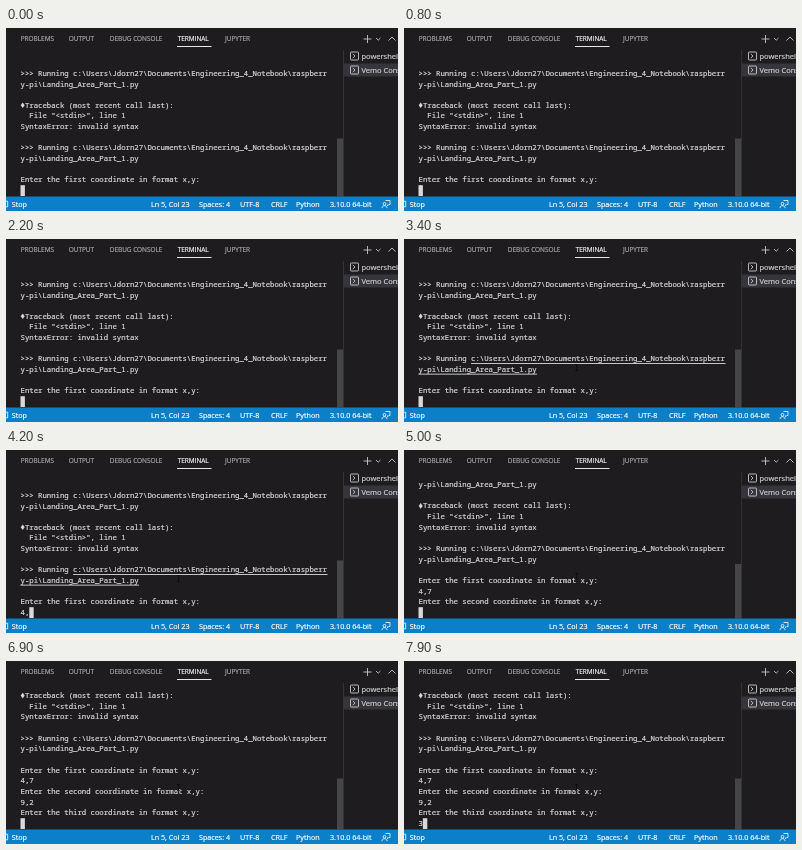
An HTML page for the animation above (8000 ms loop, 392 by 183 pixels).

```html
<!DOCTYPE html>
<html lang="en">
<head>
<meta charset="utf-8">
<title>Terminal session</title>
<style>
  html, body { margin: 0; width: 100%; height: 100%; overflow: hidden; background: #1e1c1f; }
  svg { display: block; width: 392px; height: 183px; }
  text { font-family: "Open Sans", "Noto Sans", sans-serif; white-space: pre; stroke-width: .2px; }
  .tabs { font-size: 6.45px; fill: #a4a4a4; stroke: #a4a4a4; }
  .tabs .on { fill: #f0f0f0; stroke: #f0f0f0; }
  .side { font-size: 7.5px; fill: #d0d0d0; stroke: #d0d0d0; }
  .status { font-size: 7.2px; fill: #fff; stroke: #fff; }
  .term text { font: 7.31px "Noto Sans Mono", "DejaVu Sans Mono", monospace; fill: #d8d8d8; stroke: #d8d8d8; }
  .line { fill: none; stroke: #c8c8c8; stroke-width: .9; }
</style>
</head>
<body>
<svg viewBox="0 0 392 183">
  <defs>
    <clipPath id="view"><rect y="29" width="331" height="140"/></clipPath>
    <g id="shell" class="line">
      <rect x=".5" y=".5" width="8" height="8" rx=".6"/>
      <path d="M2.8 2.4 5 4.5 2.8 6.6"/>
    </g>
  </defs>
  <rect width="392" height="183" fill="#1e1c1f"/>

  <g class="tabs">
    <text x="14.7" y="13.3">PROBLEMS</text>
    <text x="62.7" y="13.3">OUTPUT</text>
    <text x="103.7" y="13.3">DEBUG CONSOLE</text>
    <text class="on" x="171.7" y="13.3">TERMINAL</text>
    <text x="219" y="13.3">JUPYTER</text>
  </g>
  <path d="M171 18.5h34.5" stroke="#e7e7e7"/>
  <path class="line" d="M357.5 11h8M361.5 7v8M370 10l2.2 2.2 2.2-2.2M382.5 12.5l3.5-3.5 3.5 3.5"/>

  <g class="term" clip-path="url(#view)">
    <g id="buffer"></g>
    <path id="link" stroke="#d8d8d8" stroke-width=".9"/>
    <rect id="caret" width="4.4" height="10.8" y="157.2" fill="#d8d8d8"/>
  </g>
  <rect id="thumb" x="331" width="6" fill="#464548"/>
  <path d="M337.5 22v147" stroke="#343236"/>
  <g id="mouse"><path d="M-1.5 -3h3M0 -3v6M-1.5 3h3" fill="none" stroke="#050505" stroke-opacity=".6"/></g>

  <rect x="338" y="35.5" width="54" height="13" fill="#37353c"/>
  <use href="#shell" x="344" y="23.5"/>
  <use href="#shell" x="344" y="37.5"/>
  <g class="side">
    <text x="355.5" y="30.6">powershell</text>
    <text x="355.5" y="44.6">Vemo Console</text>
  </g>

  <rect y="168.5" width="392" height="14.5" fill="#0c7fc9"/>
  <g class="status">
    <text x="5.7" y="178.7">Stop</text>
    <text x="145" y="178.7">Ln 5, Col 23</text>
    <text x="193" y="178.7">Spaces: 4</text>
    <text x="234" y="178.7">UTF-8</text>
    <text x="265" y="178.7">CRLF</text>
    <text x="290" y="178.7">Python</text>
    <text x="324" y="178.7">3.10.0 64-bit</text>
  </g>
  <g fill="none" stroke="#fff" stroke-width=".8">
    <path d="M0 173.2h1.7v5.6H0"/>
    <circle cx="378.5" cy="175.8" r="1.4"/>
    <path d="M376 180.2c0-3.4 5-3.4 5 0M379.5 172.5h4.5v4h-1.2l-1.3 1.3v-1.3"/>
  </g>
</svg>
<script>
const LOOP = 8000, PITCH = 10.65, LEFT = 14.5, CHAR = 7.31 * 0.6, BOTTOM = 162.4;
const RUN = ">>> Running c:\\Users\\Jdorn27\\Documents\\Engineering_4_Notebook\\raspberr";
const FILE = "y-pi\\Landing_Area_Part_1.py";
const ask = nth => `Enter the ${nth} coordinate in format x,y:`;
const LINES = [
  RUN, FILE, "", " Traceback (most recent call last):", '  File "<stdin>", line 1',
  "SyntaxError: invalid syntax", "", RUN, FILE, "",
  ask("first"), "", ask("second"), "", ask("third"), ""
];
const FIRST_INPUT = 11;
const KEYS = [
  [3900, "4"], [4100, ","], [4500, "7"], [4900, "\n"],
  [5500, "9"], [5800, ","], [6300, "2"], [6700, "\n"], [7600, "3"]
];
const HOVER = 2800, ENTER = 4900;

const $ = id => document.getElementById(id);
const add = (tag, attrs) => {
  const el = document.createElementNS("http://www.w3.org/2000/svg", tag);
  for (const k in attrs) el.setAttribute(k, attrs[k]);
  return $("buffer").appendChild(el);
};
const rows = LINES.map((line, i) => {
  const el = add("text", { x: LEFT, y: i * PITCH + 2.6 });
  el.textContent = line;
  return el;
});
add("path", { d: `M${LEFT + 2.2} ${3 * PITCH - 2.8}l2 2.8-2 2.8-2-2.8z`, fill: "#d8d8d8" });

// Underlines of the hovered path, which wraps over two rows
const linkY = BOTTOM - 4 * PITCH + 4.7;
$("link").setAttribute("d",
  `M${LEFT + 12 * CHAR} ${linkY}H${LEFT + RUN.length * CHAR}` +
  `M${LEFT} ${linkY + PITCH}h${FILE.length * CHAR}`);

function draw(now) {
  const t = now % LOOP;
  const typed = KEYS.filter(k => k[0] <= t).map(k => k[1]).join("").split("\n");
  const step = typed.length - 1;
  const last = FIRST_INPUT + 2 * step;
  rows.forEach((row, i) => {
    if (i >= FIRST_INPUT && i % 2) row.textContent = typed[(i - FIRST_INPUT) / 2] || "";
    row.style.visibility = i <= last && i > last - 13 ? "visible" : "hidden";
  });
  $("buffer").setAttribute("transform", `translate(0 ${BOTTOM - last * PITCH})`);
  $("caret").setAttribute("x", LEFT + typed[step].length * CHAR);
  const top = 110.5 + 3.5 * step;
  $("thumb").setAttribute("y", top);
  $("thumb").setAttribute("height", 168.5 - top);
  $("link").style.visibility = t >= HOVER && t < ENTER ? "visible" : "hidden";
  $("mouse").style.visibility = t >= HOVER ? "visible" : "hidden";
  $("mouse").setAttribute("transform", `translate(172.5 ${t < ENTER ? 128.5 : 126.5})`);
}

const start = performance.now();
function tick() {
  draw(performance.now() - start);
  requestAnimationFrame(tick);
}
tick();
</script>
</body>
</html>
```
